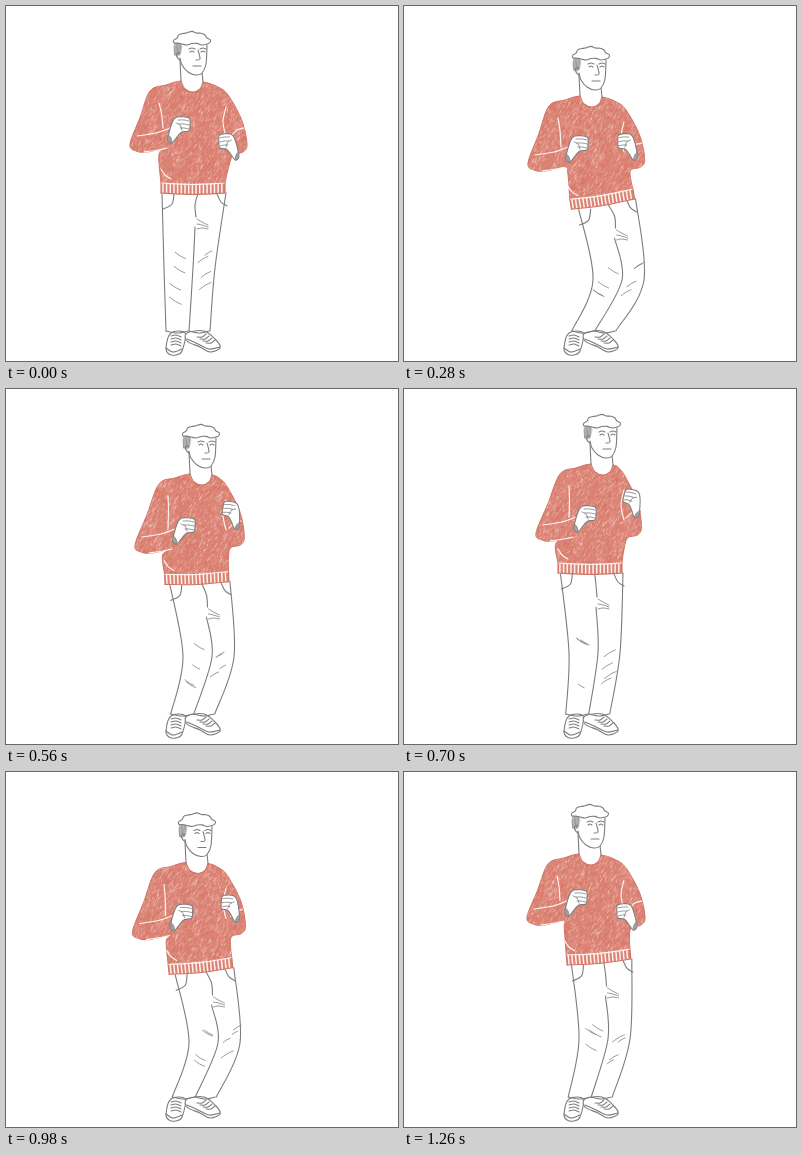
These frames come from a looping animation (392x355 px, 1400 ms). An HTML page with a canvas:

```html
<!DOCTYPE html>
<html lang="en">
<head>
<meta charset="utf-8">
<title>Dancing man</title>
<style>
html, body { margin: 0; width: 100%; height: 100%; overflow: hidden; background: #fff; }
canvas { display: block; }
</style>
</head>
<body>
<canvas id="stage" width="392" height="355"></canvas>
<script>
const W = 392, H = 355, STEP = 140;
const INK = '#7c7c7c', RED = '#db8374', EDGE = '#cf7264', SEAM = '#fff3ef';

// Each pose is a few joints; everything else hangs from them
const tall = { head: [0, 0], hem: [187, 187], knee: [183, 262], left: [175, 118], right: [221, 135] };
const low = { head: [0, 7], hem: [195, 190], knee: [200, 267], left: [174, 125], right: [221, 139] };
const bent = { head: [1, 15], hem: [199, 198], knee: [214, 274], left: [175, 137], right: [222, 135] };
const turn = { head: [9, 10], hem: [191, 194], knee: [202, 268], left: [180, 136], right: [225, 120] };
const rise = { head: [12, 0], hem: [186, 184], knee: [190, 264], left: [183, 124], right: [228, 108] };

const add = (p, x, y) => [p[0] + x, p[1] + y];
const mix = (p, q, t = .5) => [p[0] + (q[0] - p[0]) * t, p[1] + (q[1] - p[1]) * t];

function between(a, b, drop) {
  const p = {};
  for (const k in a) p[k] = add(mix(a[k], b[k]), 0, k === 'knee' ? 0 : drop);
  return p;
}

const POSES = [tall, low, bent, between(bent, turn, 3), turn, rise];

// Derive the joints of the whole figure
function rig(p) {
  const sway = p.knee[0] - tall.knee[0];
  const tilt = Math.max(0, sway - p.head[0] * 1.2) * .0054;
  const onHem = (u, v) => add(p.hem,
    u * 32 * Math.cos(tilt) + v * Math.sin(tilt), -u * 32 * Math.sin(tilt) + v * Math.cos(tilt));
  const neck = add(p.head, 186, 76);
  return {
    ...p, sway, onHem, neck,
    shoulderL: add(neck, -42, 9),
    shoulderR: [222, neck[1] + 13],
    elbowL: add(p.left, -51, 20),
    elbowR: [241 - p.head[0] * .3, neck[1] + 62],
    cuff: add(p.left, -14, 24),
    crotch: [(p.hem[0] + p.knee[0]) / 2 + 4, p.hem[1] + 34]
  };
}

function random(seed) {
  return () => (seed = (seed * 16807) % 2147483647) / 2147483647;
}

// Catmull-Rom curve through the points
function trace(c, pts, closed) {
  const n = pts.length;
  const at = i => closed ? pts[(i + n) % n] : pts[Math.max(0, Math.min(n - 1, i))];
  c.beginPath();
  c.moveTo(...pts[0]);
  for (let i = 0; i < (closed ? n : n - 1); i++) {
    const [a, b, d, e] = [at(i - 1), at(i), at(i + 1), at(i + 2)];
    c.bezierCurveTo(b[0] + (d[0] - a[0]) / 6, b[1] + (d[1] - a[1]) / 6,
      d[0] - (e[0] - b[0]) / 6, d[1] - (e[1] - b[1]) / 6, d[0], d[1]);
  }
}

function line(c, pts, color = INK, width = 1.1) {
  trace(c, pts);
  c.strokeStyle = color;
  c.lineWidth = width;
  c.stroke();
}

function shape(c, pts, fill = '#fff', color = INK, width = 1.1) {
  trace(c, pts, true);
  c.fillStyle = fill;
  c.fill();
  if (!color) return;
  c.strokeStyle = color;
  c.lineWidth = width;
  c.stroke();
}

function drawLegs(c, r, rnd) {
  const { knee, sway, crotch } = r;
  const hips = [add(r.onHem(-1, 0), 1 + sway * .2, 0), crotch, add(r.onHem(1, 0), 1, 0)];
  const knees = [-25, 4, 26].map(x => add(knee, x, 0));
  const ankles = [160, 183, 204].map(x => [x + sway * .25, 325]);
  hips.forEach((h, i) => line(c, [h, knees[i], ankles[i]]));
  for (let i = 0; i < 2; i++) {
    line(c, [ankles[i], add(mix(ankles[i], ankles[i + 1]), 0, 2), add(ankles[i + 1], -1, 0)]);
  }

  // pockets and fly
  line(c, [add(hips[0], 12, 0), add(hips[0], 10, 11), add(hips[0], 1, 16)]);
  line(c, [add(hips[2], -9, 1), add(hips[2], -5, 9), add(hips[2], 1, 13)]);
  line(c, [r.onHem(.15, 1), add(crotch, 0, -22), add(crotch, 1, -10)]);

  // creases fan out from the crotch and gather at the knees
  for (let i = 0; i < 3; i++) {
    line(c, [add(crotch, 2, i * 5 - 8), add(crotch, 7, i * 3 - 5), add(crotch, 13, i * 2 - 2)], INK, .8);
  }
  for (let i = 0; i < 8; i++) {
    const side = i % 2, t = rnd() * .8;
    const from = add(mix(knees[side], ankles[side], t - .25), 4 + rnd() * 8, 0);
    const len = 5 + rnd() * 7, drop = (side ? -.6 : .6) * len;
    line(c, [from, add(from, len * .5, drop * .6), add(from, len, drop)], INK, .8);
  }
}

function drawShoes(c) {
  shape(c, [[165, 327], [160, 342], [163, 348], [170, 349], [176, 345], [179, 327]]);
  line(c, [[160, 342], [167, 346], [176, 343]]);
  shape(c, [[181, 327], [181, 335], [194, 341], [204, 346], [214, 342], [210, 334], [198, 325]]);
  line(c, [[181, 333], [190, 337], [203, 343], [214, 341]]);
  for (let i = 0; i < 4; i++) {
    line(c, [[165, 330 + i * 3], [170, 329 + i * 3], [175, 331 + i * 3]]);
    line(c, [[191 + i * 3, 331 + i * 2], [196 + i * 3, 331 + i * 2], [200 + i * 3, 328 + i * 2]]);
  }
}

function outline(r) {
  const { neck, shoulderL, shoulderR, elbowL, elbowR, cuff, onHem } = r;
  const hipL = onHem(-1, -10), hipR = onHem(1, -10);
  return [
    hipL, [hipL[0] - 2, cuff[1] + 6], cuff,
    add(elbowL, 17, 8), add(elbowL, 6, 7), elbowL,
    mix(elbowL, shoulderL), shoulderL, add(neck, -26, 3), add(neck, -11, -1),
    add(neck, 11, 0), add(mix(neck, shoulderR, .6), 4, -3), shoulderR,
    add(mix(shoulderR, elbowR), 4, 0), elbowR, add(elbowR, -4, 8), add(elbowR, -14, 11),
    mix(add(elbowR, -16, 12), hipR), hipR
  ];
}

function drawSweater(c, r, rnd) {
  trace(c, outline(r));
  c.closePath();
  c.fillStyle = RED;
  c.fill();
  c.strokeStyle = EDGE;
  c.lineWidth = 1;
  c.stroke();
  c.save();
  c.clip();
  // pencil grain, lighter in soft patches
  for (let i = 0; i < 3400; i++) {
    const x = 120 + rnd() * 125, y = 72 + rnd() * 130, len = .8 + rnd() * 2.4;
    const light = .55 + .25 * Math.sin(x * .3 + y * .04) * Math.sin(y * .09);
    c.strokeStyle = rnd() < light ? 'rgba(255,240,234,.3)' : 'rgba(203,92,78,.24)';
    c.lineWidth = .5 + rnd() * .6;
    c.beginPath();
    c.moveTo(x, y);
    c.lineTo(x - len * .5, y + len);
    c.stroke();
  }
  c.restore();
  drawSeams(c, r);
  drawHem(c, r.onHem);
}

function drawSeams(c, r) {
  const { shoulderL, shoulderR, elbowL, elbowR, cuff, left, right, onHem } = r;
  const seam = (...pts) => line(c, pts, SEAM, 1.2);
  const crook = add(left, -18, 4), fold = onHem(-1, -24);
  seam(add(shoulderL, 9, 12), add(mix(shoulderL, crook), 5, 4), crook);
  seam(add(left, -11, 4), add(left, -25, 9), add(elbowL, 7, -8));
  seam(cuff, add(cuff, -9, 2), add(elbowL, 14, 8));
  seam(add(shoulderR, -2, 12), add(shoulderR, -5, 27), add(shoulderR, -2, 42));
  seam(add(elbowR, -3, -16), add(elbowR, -10, -14), add(elbowR, -15, -9));
  seam(fold, add(fold, 4, 6), add(fold, 10, 10));
}

function drawHem(c, onHem) {
  const edge = v => [-1, 0, 1].map(u => onHem(u, v + 1.5 * (1 - u * u)));
  const top = edge(-10), low = edge(0);
  c.beginPath();
  [...top, ...low.slice().reverse()].forEach(q => c.lineTo(...q));
  c.closePath();
  c.fillStyle = RED;
  c.fill();
  for (let u = -.94; u < 1; u += .115) line(c, [onHem(u, -9), onHem(u, .5)], SEAM, 1.5);
  line(c, top, SEAM, 1.2);
  line(c, low, EDGE);
  for (const i of [0, 2]) line(c, [top[i], low[i]], EDGE);
}

function drawHead(c, r) {
  const { neck, head } = r;
  const collar = [add(neck, -11, -1), add(neck, -7, 7), add(neck, 1, 10), add(neck, 8, 7), add(neck, 11, 0)];
  const nape = add(head, 174, 54), jaw = add(head, 196, 66);
  shape(c, [nape, ...collar, jaw], '#fff', null);
  line(c, collar, EDGE);
  line(c, [nape, collar[0]]);
  line(c, [jaw, collar[4]]);

  c.save();
  c.translate(...head);
  const face = [[174, 52], [176, 59], [182, 66], [190, 69], [196, 67], [200, 58], [201, 39]];
  shape(c, [...face, [174, 37]], '#fff', null);
  line(c, face);
  shape(c, [[168, 39], [168, 47], [171, 51], [175, 47], [176, 39]], '#d2d2d2', null);
  for (let i = 0; i < 5; i++) line(c, [[169 + i * 1.5, 37], [168.5 + i * 1.3, 49]], INK, .7);
  line(c, [[174, 47], [171, 47], [171, 51], [174, 54]]);

  // wavy hair: a bumpy dome over a rippled fringe
  const hair = [];
  for (let i = 0; i <= 12; i++) {
    const a = Math.PI * (1 + i / 12), bump = 1 + .06 * Math.sin(i * 2.4);
    hair.push([186 + 18 * bump * Math.cos(a), 37 + 11 * bump * Math.sin(a)]);
  }
  for (let i = 0; i <= 6; i++) hair.push([201 - i * 5, 38 + Math.sin(i * 1.9)]);
  shape(c, hair);

  for (const x of [186, 197]) {
    line(c, [[x - 3, 43], [x, 42], [x + 3, 43]]);
    line(c, [[x - 2, 46], [x, 45], [x + 2, 46]]);
  }
  line(c, [[192, 44], [194, 53], [190, 54]]);
  line(c, [[187, 60], [195, 60]]);
  c.restore();
}

function drawHand(c, [x, y], angle, side) {
  c.save();
  c.translate(x, y);
  c.rotate(angle);
  c.scale(side, 1);
  shape(c, [[-9, -1], [-4, -7], [8, -6], [9, 1], [8, 7], [1, 8], [-4, 13], [-9, 19], [-13, 15]]);
  shape(c, [[-13, 11], [-13, 17], [-9, 19], [-10, 14]], '#a0a0a0', INK, .7);
  for (let i = 0; i < 3; i++) line(c, [[i - 3, i * 4 - 4], [3, i * 4 - 4], [8, i * 4 - 3]], INK, .8);
  line(c, [[-5, -1], [-1, 1], [1, 6]], INK, .8);
  c.restore();
}

function render(p, i) {
  const cv = document.createElement('canvas');
  cv.width = W;
  cv.height = H;
  const c = cv.getContext('2d');
  const r = rig(p), rnd = random(91 + i * 577);
  c.lineCap = c.lineJoin = 'round';
  c.fillStyle = '#fff';
  c.fillRect(0, 0, W, H);
  drawShoes(c);
  drawLegs(c, r, rnd);
  drawSweater(c, r, rnd);
  drawHead(c, r);
  drawHand(c, r.left, 0, 1);
  drawHand(c, r.right, r.head[0] * .024, -.9);
  return cv;
}

const drawings = POSES.map(render);
const ctx = document.getElementById('stage').getContext('2d');
const start = performance.now();

// Sway through the poses and back again
function tick() {
  const last = POSES.length - 1;
  const beat = Math.floor((performance.now() - start) / STEP) % (2 * last);
  ctx.drawImage(drawings[last - Math.abs(last - beat)], 0, 0);
  requestAnimationFrame(tick);
}
tick();
</script>
</body>
</html>
```
